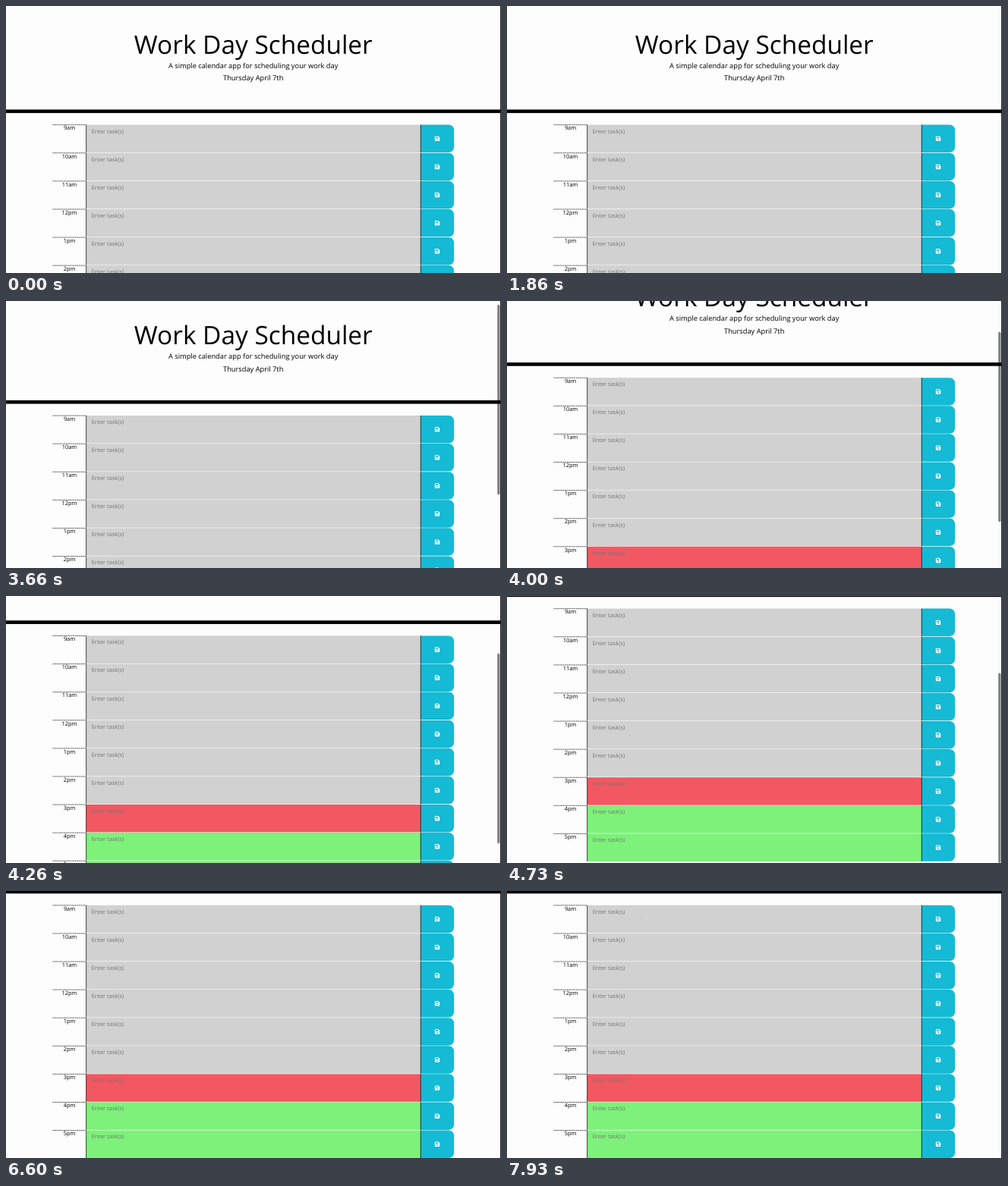
An HTML page for the animation above (8000 ms loop, 652 by 352 pixels).

```html
<!DOCTYPE html>
<html lang="en">
<head>
<meta charset="utf-8">
<title>Work Day Scheduler</title>
<style>
  @property --scroll { syntax: "<number>"; inherits: true; initial-value: 0; }

  html, body { margin: 0; width: 100%; height: 100%; overflow: hidden; background: #fdfdfd; }

  svg {
    display: block;
    width: 652px;
    height: 352px;
    font-family: "Open Sans", sans-serif;
    text-rendering: geometricPrecision;
    animation: scroll 8s linear infinite;
  }
  .page { transform: translateY(calc(var(--scroll) * -1px)); }
  .title { font-size: 33.4px; }
  .lead { font-size: 9.27px; }
  .hour, .hint { font-size: 7.42px; }
  .mid { text-anchor: middle; }
  .hint { fill: #757575; }
  .dash { stroke: #000; stroke-width: .8; stroke-dasharray: 1.5 .95; }
  .past { fill: #d1d1d1; }
  .present { fill: #f25862; }
  .future { fill: #7df17a; }
  .save { fill: #15bad4; }
  .thumb {
    fill: #000;
    transform: translateY(calc(var(--scroll) * .718px));
    animation: thumb 8s linear infinite;
  }
  .caret { animation: caret 8s linear infinite; }

  @keyframes scroll {
    0%, 43.6% { --scroll: 0; animation-timing-function: cubic-bezier(.4, 0, .7, .5); }
    45.75% { --scroll: 5.5; animation-timing-function: cubic-bezier(.33, .15, .67, .66); }
    53.25% { --scroll: 104; animation-timing-function: cubic-bezier(.3, .45, .6, 1); }
    57% { --scroll: 142; animation-timing-function: ease-in-out; }
    59.125% { --scroll: 140; animation-timing-function: ease-out; }
    60.9%, 100% { --scroll: 137.8; }
  }
  @keyframes thumb {
    0%, 44% { opacity: 0; }
    44.01%, 62.4% { opacity: .5; }
    66%, 100% { opacity: 0; }
  }
  @keyframes caret {
    0%, 64.99% { opacity: 0; transform: translate(253px, 188px); }
    65% { opacity: 1; transform: translate(253px, 188px); }
    66.6% { transform: translate(251.4px, 184.5px); }
    72.5% { transform: translate(238px, 200px); }
    80.75%, 82.5% { transform: translate(206px, 146px); }
    86.6%, 90.75% { transform: translate(195px, 100px); }
    95.75%, 97.5% { transform: translate(181px, 50px); }
    99.1%, 100% { opacity: 1; transform: translate(177.2px, 40.5px); }
  }
</style>
</head>
<body>
<svg viewBox="0 0 652 352">
  <defs>
    <path id="disk" fill="#fff" fill-rule="evenodd"
      d="M-2.5-3.2H1.5L3.2-1.5V2.5Q3.2 3.2 2.5 3.2H-2.5Q-3.2 3.2-3.2 2.5V-2.5Q-3.2-3.2-2.5-3.2Z
         M-2.2-2.2V-.5H1.2V-2.2Z M-.9 1.2A.9.9 0 1 0 .9 1.2A.9.9 0 1 0-.9 1.2Z"/>
  </defs>
  <rect width="652" height="352" fill="#fdfdfd"/>
  <g class="page">
    <text class="title mid" x="325.8" y="62.7">Work Day Scheduler</text>
    <text class="lead mid" x="325.7" y="81.6">A simple calendar app for scheduling your work day</text>
    <text class="lead mid" x="325.7" y="98.3">Thursday April 7th</text>
    <rect y="136.5" width="652" height="4.64"/>
    <g id="rows"></g>
  </g>
  <rect x="651" width="1" height="352" fill="#222"/>
  <rect class="thumb" x="647.2" y=".8" width="3.3" height="250.6" rx="1.65"/>
  <g class="caret">
    <path d="M0-3.6V3.6" stroke="#eee" stroke-width="1.8"/>
    <path d="M0-3.6V3.6" stroke="#777" stroke-width=".9" stroke-dasharray="1.2 1.2"/>
  </g>
</svg>
<script>
  const hours = ["9am", "10am", "11am", "12pm", "1pm", "2pm", "3pm", "4pm", "5pm"];
  const now = 6, top0 = 155.97, pitch = 37.09;
  const state = i => i < now ? "past" : i === now ? "present" : "future";

  const row = (hour, i) => `
    <g transform="translate(0 ${top0 + i * pitch})">
      <path class="dash" d="M61.6.7H105.6"/>
      <text class="hour mid" x="83.5" y="7.5">${hour}</text>
      <rect class="${state(i)}" x="105.6" y=".6" width="440.5" height="36.5"/>
      <rect x="105.4" y=".6" width=".7" height="36.5"/>
      <text class="hint" x="112.7" y="11.6">Enter task(s)</text>
      <path class="save" d="M546 .6H583.1a7 7 0 0 1 7 7V30.1a7 7 0 0 1-7 7H546Z"/>
      <rect x="545.8" y=".6" width=".7" height="36.5"/>
      <use href="#disk" x="568" y="18.9"/>
    </g>`;

  document.getElementById("rows").innerHTML = hours.map(row).join("");
</script>
</body>
</html>
```
